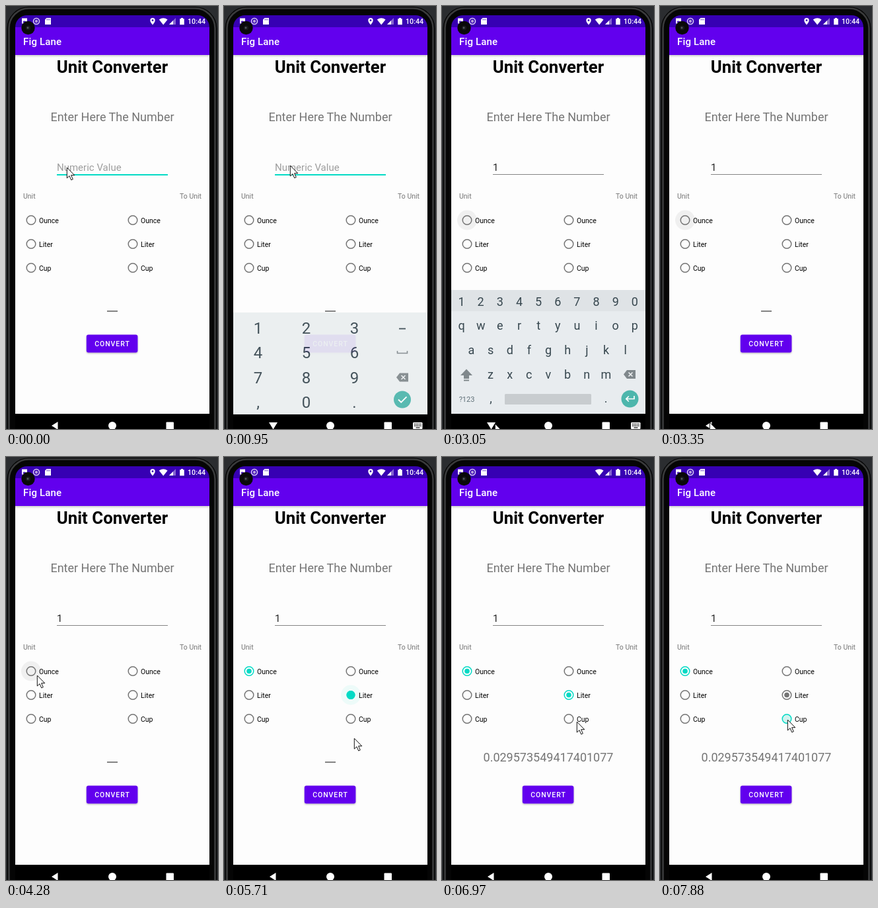
Animation of 321x639 px, one loop 8000 ms. Source, as an HTML page:

```html
<!DOCTYPE html>
<html lang="en">
<head>
<meta charset="utf-8">
<title>Unit converter</title>
<style>
html, body { margin: 0; width: 100%; height: 100%; overflow: hidden; background: #2b2d30; }
svg { display: block; width: 100%; height: 100%; }
text { font-family: Roboto, Arial, sans-serif; white-space: pre; }
.mid { text-anchor: middle; }
.gray { fill: #757575; }
.small { font-size: 10.5px; }
.big { font-size: 18px; }
.keys text { fill: #37474f; text-anchor: middle; }
.pad text { font-size: 24px; }
.letters text { font-size: 18px; }
</style>
</head>
<body>
<svg viewBox="0 0 321 639">
  <defs>
    <linearGradient id="shade" x2="0" y2="1">
      <stop stop-color="#000" stop-opacity=".18"/><stop offset="1" stop-color="#000" stop-opacity="0"/>
    </linearGradient>
    <filter id="lift" x="-10%" y="-20%" width="120%" height="150%">
      <feDropShadow dx="0" dy="1.2" stdDeviation=".9" flood-opacity=".3"/>
    </filter>
    <g id="erase">
      <path d="M-9 0l5-6.5h13v13h-13z" fill="#80888c"/>
      <path d="M-1.5-3l6 6m0-6l-6 6" stroke="#eceff1" stroke-width="1.6"/>
    </g>
  </defs>

  <!-- phone body -->
  <rect width="321" height="639" fill="#2b2d30"/>
  <rect x="1.5" y="1" width="318" height="700" rx="33" fill="#050505"/>
  <rect x="4.5" y="3.5" width="312" height="700" rx="30" fill="none" stroke="#3a3b3c" stroke-width="2.6"/>

  <!-- screen -->
  <rect x="14" y="74" width="294" height="542" fill="#fdfdfd"/>
  <rect x="14" y="74" width="294" height="4" fill="url(#shade)"/>
  <path d="M14 33V32a18 18 0 0 1 18-18H290a18 18 0 0 1 18 18V33z" fill="#3700b3"/>
  <rect x="14" y="32" width="294" height="42" fill="#6200ee"/>
  <rect x="14" y="616" width="294" height="23"/>

  <!-- status bar -->
  <g fill="#fff">
    <path d="M24 18.5h8v8h-8z"/>
    <path d="M25.3 25l2-3 1.5 1.6 1-1.2 1.4 2.6z" fill="#3700b3"/>
    <circle cx="46" cy="23" r="4.5" fill="none" stroke="#d8ccf4" stroke-width="1.6"/>
    <circle cx="46" cy="23" r="2.2" fill="#b39ddb"/>
    <path d="M61.5 18H68v10h-9v-7.5z"/>
    <path d="M62 19.5v2m2-2v2m2-2v2" stroke="#3700b3" stroke-width=".8"/>
    <path id="pin" fill-rule="evenodd" d="M222 28.5c-2.4-3-3.7-4.8-3.7-6.8a3.7 3.7 0 0 1 7.4 0c0 2-1.3 3.8-3.7 6.8zM222 20.3a1.4 1.4 0 1 0 0 2.8 1.4 1.4 0 0 0 0-2.8z"/>
    <path d="M231.8 20.6q6.4-4.8 12.8 0L238.2 28.5z"/>
    <path d="M247 28h10V18z" opacity=".4"/><path d="M247 28h6v-6z"/>
    <path d="M265 18h3v1.2h1.8V28.3h-6.6V19.2h1.8z"/>
    <text x="275" y="27" font-size="10.7" font-weight="500">10:44</text>
  </g>
  <circle cx="33.5" cy="33" r="10.2" fill="#090909"/>
  <circle cx="33.5" cy="33" r="3.6" fill="#17181b"/>
  <circle cx="33" cy="33" r="1.4" fill="#555961"/>
  <text x="26" y="59" font-size="15" font-weight="500" letter-spacing=".15" fill="#fff">Fig Lane</text>

  <!-- form -->
  <text class="mid" x="161" y="101" font-size="25.8" font-weight="700">Unit Converter</text>
  <text class="mid gray big" x="161" y="174">Enter Here The Number</text>
  <text id="entry" x="77" y="249" font-size="15"></text>
  <rect id="line" x="77" width="168"/>
  <text class="gray small" x="26" y="291">Unit</text>
  <text class="gray small" x="296" y="291" text-anchor="end">To Unit</text>
  <g id="radios"></g>
  <path id="blank" d="M153 461h16" stroke="#757575" stroke-width="1.8"/>
  <text id="result" class="mid gray big" x="161" y="460">0.029573549417401077</text>
  <rect x="121.8" y="496.6" width="77.6" height="27" rx="3" fill="#6200ee" filter="url(#lift)"/>
  <text class="mid small" x="161" y="514" font-weight="500" letter-spacing=".94" fill="#fff">CONVERT</text>

  <!-- numeric keypad -->
  <g id="pad" class="keys pad">
    <rect x="14" y="463" width="294" height="154" fill="#eaeef0"/>
    <path d="M265 487.5h10" stroke="#37474f" stroke-width="1.8"/>
    <path d="M262.5 521v3.5h15V521" fill="none" stroke="#80888c" stroke-width="1.6"/>
    <use href="#erase" x="270" y="561"/>
    <circle cx="270" cy="594.5" r="13" fill="#4db6ac"/>
    <path d="M264 594.5l4.2 4.2 8.3-8.3" fill="none" stroke="#fff" stroke-width="1.8"/>
  </g>

  <!-- letter keyboard -->
  <g id="letters" class="keys letters">
    <rect x="14" y="429" width="294" height="187" fill="#e8ecef"/>
    <rect x="14" y="429" width="294" height="32" fill="#dfe3e6"/>
    <path d="M37 548.5l9 9.5h-5v5h-8v-5h-5zM33 564.5h8v2h-8z" fill="#80888c"/>
    <use href="#erase" x="284" y="556.5"/>
    <rect x="95" y="586" width="131" height="16" rx="1.5" fill="#c8cccf"/>
    <text x="37.5" y="598" style="font-size:11px;fill:#607078">?123</text>
    <text x="74" y="599">,</text><text x="248" y="599">.</text>
    <circle cx="284.5" cy="593.5" r="13" fill="#4db6ac"/>
    <path d="M291 589v4.5h-12m3.8-4l-4 4 4 4" fill="none" stroke="#fff" stroke-width="1.7"/>
  </g>

  <!-- navigation -->
  <g fill="#fff">
    <path id="back" d="M69 634l9.5-6v12z"/>
    <path id="down" d="M68 629h13l-6.5 10.5z"/>
    <circle cx="161" cy="634" r="6"/>
    <rect x="242.5" y="628.5" width="11.5" height="11.5" rx="1"/>
    <g id="board">
      <rect x="286" y="629" width="14.5" height="10" rx="1.2"/>
      <path d="M288 631.5h11M288 634.2h11" stroke="#000" stroke-width="1.4" stroke-dasharray="1.4 .9"/>
      <path d="M290.5 637h6" stroke="#000" stroke-width="1.2"/>
    </g>
  </g>

  <path id="cursor" d="M-.7 0V16l3.7-3.4 2.7 6.2 2.6-1.1-2.7-6H10.8z" fill="#fff" stroke="#111"/>
</svg>

<script>
const $ = id => document.getElementById(id);
const LOOP = 8000, STEP = 133.56, LEAD = 35, LAST = 59;
const TEAL = '#03dac5', GRAY = '#757575';

function add(parent, tag, attrs, text = '') {
  const el = document.createElementNS('http://www.w3.org/2000/svg', tag);
  for (const name in attrs) el.setAttribute(name, attrs[name]);
  el.textContent = text;
  return parent.appendChild(el);
}
const set = (el, attrs) => { for (const name in attrs) el.setAttribute(name, attrs[name]); };
const show = (el, on) => el.setAttribute('opacity', +on);

function keyRow(parent, chars, x, y, gap) {
  [...chars].forEach((c, i) => add(parent, 'text', { x: x + gap * i, y }, c));
}
['123', '456', '789', ',0.'].forEach((row, i) => keyRow($('pad'), row, 51.5, 495 + 37.4 * i, 73));
keyRow($('letters'), '1234567890', 29.5, 452.5, 29.15);
keyRow($('letters'), 'qwertyuiop', 29.5, 488.5, 29.15);
keyRow($('letters'), 'asdfghjkl', 44.5, 525.5, 29.15);
keyRow($('letters'), 'zxcvbnm', 73.5, 562.5, 29.15);

function makeRadio(x, row, label) {
  const cx = x, cy = 323.5 + 36 * row, at = { cx, cy };
  const halo = add($('radios'), 'circle', { ...at, r: 15 });
  const ring = add($('radios'), 'circle', { ...at, 'stroke-width': 1.5 });
  const dot = add($('radios'), 'circle', at);
  add($('radios'), 'text', { x: x + 12, y: cy + 4, class: 'small' }, label);
  return ({ color = GRAY, size = 0, rim = 6.8, fill = 'none', glow = 'none' }) => {
    set(halo, { fill: glow });
    set(ring, { stroke: color, fill, r: rim });
    set(dot, { fill: color, r: size });
  };
}
const [from, to] = [38, 192].map(x => ['Ounce', 'Liter', 'Cup'].map((name, i) => makeRadio(x, i, name)));
[...from, ...to].forEach(draw => draw({}));

// Pointer stops: step, x, y
const path = [
  [0, 93, 244], [3, 98, 240], [7, 101, 241], [11, 101, 241], [16, 279, 592], [19, 279, 592],
  [23, 81, 631], [24, 76, 629], [26, 76, 629], [30, 53, 350], [32, 48, 330], [33, 42, 326],
  [35, 42, 326], [40, 194, 362], [42, 197, 367], [43, 198, 425], [45, 165, 508], [47, 165, 508],
  [50, 190, 468], [52, 205, 400], [55, 195, 397], [LAST, 194, 397]
];
function pointer(k) {
  const i = Math.max(1, path.findIndex(p => p[0] >= k));
  const [a, b] = [path[i - 1], path[i]];
  const u = (k - a[0]) / (b[0] - a[0]);
  return [1, 2].map(n => a[n] + (b[n] - a[n]) * u);
}

function panel(el, alpha, drop) {
  set(el, { opacity: alpha, transform: `translate(0 ${drop})` });
}

// A picked radio shrinks into a disc, then reopens around its dot
const pick = age => ({ color: TEAL, size: [0, 6.5, 4.8][age] ?? 3.8, rim: [6.8, 5.8, 6.4][age] });

function draw(k) {
  const [x, y] = pointer(k);
  set($('cursor'), { transform: `translate(${x} ${y})` });

  const typed = k >= 11, focused = k < 19;
  $('entry').textContent = typed ? '1' : 'Numeric Value';
  set($('entry'), { fill: typed ? '#222' : '#9e9e9e' });
  set($('line'), focused ? { y: 254, height: 2, fill: TEAL } : { y: 254, height: 1, fill: '#858585' });

  panel($('pad'), k < 6 || k >= 20 ? 0 : k === 6 ? .6 : k === 7 ? .93 : 1, k === 6 ? 8 : 0);
  panel($('letters'), k < 20 || k > 24 ? 0 : k === 24 ? .5 : 1, k === 24 ? 8 : 0);
  const open = k >= 6 && k < 25;
  show($('back'), !open);
  show($('down'), open);
  show($('board'), open);

  from[0](k >= 33 ? pick(k - 33) : { glow: focused ? 'none' : '#f0f0f0' });
  const glow = ['#f4fdfc', '#edfbf9', '#f4fdfc'][k - 42] || 'none';
  to[1](k < 42 ? {} : k < LAST ? { ...pick(k - 42), glow } : { size: 3.8 });
  to[2](k < LAST ? {} : { color: TEAL, fill: '#d0f3ef' });

  const done = k >= 47;
  show($('result'), done);
  show($('blank'), !done);
  show($('pin'), !done);
}

const start = performance.now();
let shown = -1;
function tick() {
  const t = (performance.now() - start) % LOOP;
  const k = Math.min(LAST, Math.floor((t + LEAD) / STEP));
  if (k !== shown) draw(shown = k);
  requestAnimationFrame(tick);
}
tick();
</script>
</body>
</html>
```
